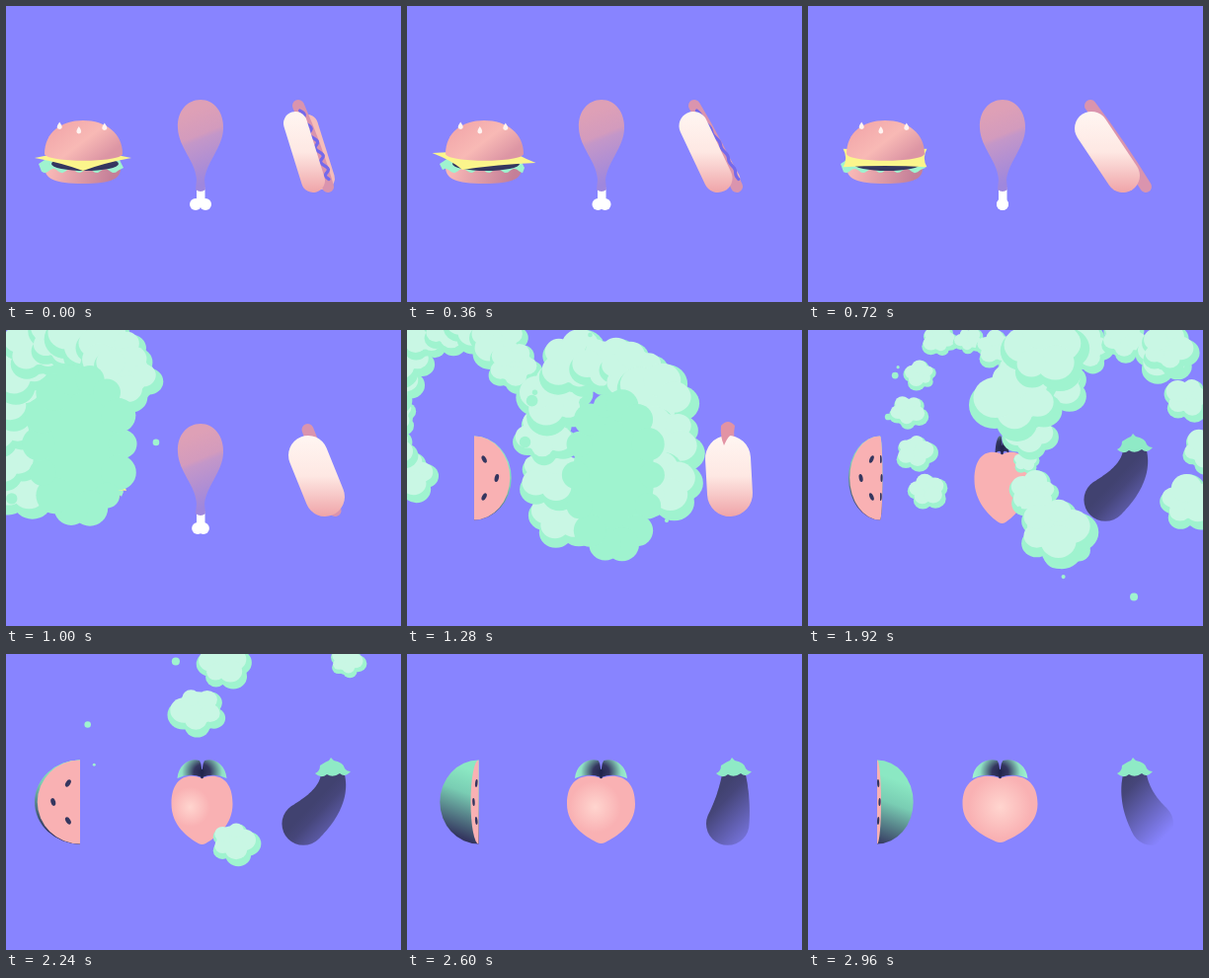
An HTML page with a canvas for the animation above (3000 ms loop, 400 by 300 pixels).

```html
<!DOCTYPE html>
<html lang="en">
<head>
<meta charset="utf-8">
<title>Food swap</title>
<style>
  html, body { margin: 0; width: 100%; height: 100%; overflow: hidden; background: #8884ff; }
  canvas { display: block; }
</style>
</head>
<body>
<canvas id="stage" width="400" height="300"></canvas>
<script>
const ctx = document.getElementById('stage').getContext('2d');
const LOOP = 3000, STEP = 40;
const BG = '#8884ff', MINT = '#9ff3cf', PALE = '#c9f7e4', NAVY = '#34365f', FLESH = '#f9b1b3';
const BURGER_END = 1040, CHICKEN_END = 1280, HOTDOG_END = 1600;
const rad = deg => deg * Math.PI / 180;
const clamp = v => Math.min(1, Math.max(0, v));
const mix = (a, b, k) => a + (b - a) * k;
const random = n => Math.abs(Math.sin(n * 127.1 + 3.7) * 43758.5453) % 1;

// Rows are [time, ...values]; returns the values at time t.
function track(t, rows) {
  let i = 0;
  while (i < rows.length - 2 && t > rows[i + 1][0]) i++;
  const a = rows[i], b = rows[i + 1];
  const k = clamp((t - a[0]) / (b[0] - a[0]));
  return a.slice(1).map((v, j) => mix(v, b[j + 1], k));
}

function stops(g, list) {
  list.forEach(([p, c]) => g.addColorStop(p, c));
  return g;
}
const linear = (x1, y1, x2, y2, ...list) => stops(ctx.createLinearGradient(x1, y1, x2, y2), list);
const radial = (x, y, r, ...list) => stops(ctx.createRadialGradient(x, y, 0, x, y, r), list);

function shape(d, fill) {
  ctx.fillStyle = fill;
  ctx.fill(new Path2D(d));
}

function oval(x, y, rx, ry, fill, tilt = 0) {
  ctx.fillStyle = fill;
  ctx.beginPath();
  ctx.ellipse(x, y, rx, ry, tilt, 0, 2 * Math.PI);
  ctx.fill();
}

function rod(x1, y1, x2, y2, w, color, bulge = 0) {
  ctx.strokeStyle = color;
  ctx.lineWidth = w;
  ctx.lineCap = 'round';
  ctx.beginPath();
  ctx.moveTo(x1, y1);
  ctx.quadraticCurveTo((x1 + x2) / 2 + bulge, (y1 + y2) / 2, x2, y2);
  ctx.stroke();
}

function burger(t) {
  shape('M39 163 L116 163 C117 175 107 180 78 180 C49 180 39 175 39 163Z',
    linear(45, 165, 105, 182, [0, '#f8b7b5'], [1, '#c47f98']));

  let leaf = 'M33 160 L42 154 L114 154 L119 164';
  for (let x = 117; x >= 34; x -= 3) leaf += ` L${x} ${167 + 2.2 * Math.sin(x * 0.36 + t / 110)}`;
  shape(leaf + 'Z', MINT);
  oval(80, 160, 34, 7, NAVY);

  // Square slice turning around the vertical axis
  const turn = rad(t * 0.3125);
  const reach = 49 + 11 * Math.abs(Math.sin(2 * turn));
  ctx.fillStyle = '#fbf58c';
  ctx.beginPath();
  for (let k = 0; k <= 4; k++) {
    const a = turn + k * Math.PI / 2, mid = a - Math.PI / 4;
    const x = 78 + reach * Math.cos(a), y = 154 + 13 * Math.sin(a);
    if (k) ctx.quadraticCurveTo(78 + reach * 0.62 * Math.cos(mid), 154 + 7 * Math.sin(mid), x, y);
    else ctx.moveTo(x, y);
  }
  ctx.fill();

  shape('M39 150 C39 128 56 116 78 116 C101 116 118 129 118 150 C116 159 41 159 39 150Z',
    linear(60, 118, 92, 160, [0, '#f3a9ab'], [0.5, '#f8b9b5'], [1, '#dc95a4']));
  for (let k = 0; k < 4; k++) {
    const a = rad(8 + k * 90 + t * 0.25), depth = Math.sin(a);
    if (depth < -0.3) continue;
    const x = 77 + 23 * Math.cos(a), y = 122 + 4 * depth;
    shape(`M${x} ${y - 4} Q${x + 5} ${y + 3} ${x} ${y + 3.5} Q${x - 5} ${y + 3} ${x} ${y - 4}Z`, '#fff3f1');
  }
}

function chicken(t) {
  const gap = 5 * Math.abs(Math.cos(rad(t * 0.125)));
  ctx.fillStyle = '#fff';
  ctx.fillRect(193, 184, 8.5, 16);
  for (const side of [-1, 1]) oval(197 + side * gap, 201, 6, 6, '#fff');
  shape('M197 95 C211 95 221 108 220 125 C219 144 203 158 201 176 L202 186 Q197 190 192 186 L193 176 C192 157 175 144 174 124 C173 107 183 95 197 95Z',
    linear(184, 108, 211, 175, [0, '#dea0b6'], [0.35, '#d39bbd'], [0.42, '#c497c8'], [1, '#9f87dd']));
}

function hotdog(t) {
  const [cx, lean, w, sx, tilt] = track(t, [
    [0, 302, 9, 24, 311, 15],
    [720, 303, 16, 34, 314, 28],
    [1280, 326, 1, 46, 325, 0]
  ]);
  const left = sx - tilt, right = sx + tilt;
  rod(left + 9, 121, right - 4, 175, Math.max(8, 22 - t / 50), '#f6bdb9');
  rod(left, 101, right, 183, 12, '#da94ae', 3);

  const amp = 2.6 * (1 - t / 560);
  if (amp > 0) {
    ctx.strokeStyle = '#7469ec';
    ctx.lineWidth = 3.2;
    ctx.beginPath();
    for (let k = 0; k <= 1; k += 0.02) {
      const side = (4 + t / 180) * (0.4 + 2 * k * (1 - k));
      ctx.lineTo(mix(left, right, k) + side + amp * Math.sin(k * 32), mix(106, 177, k));
    }
    ctx.stroke();
  }

  rod(cx - lean, 107 + w / 2, cx + lean, 189 - w / 2, w,
    linear(cx, 107, cx, 189, [0, '#fff6f2'], [0.5, '#fee8e3'], [1, '#efa4a8']));
  if (t > 1000) {
    shape(`M${sx - 7} 97 Q${sx} 89 ${sx + 7} 97 L${sx + 6} 104 Q${sx} 107 ${sx - 4} 117 Q${sx - 8} 108 ${sx - 7} 97Z`, '#e293a4');
  }
}

function halfOval(x, rx, fill) {
  ctx.fillStyle = fill;
  ctx.beginPath();
  ctx.ellipse(x, 150, Math.abs(rx), 42.5, 0, -Math.PI / 2, Math.PI / 2, rx < 0);
  ctx.fill();
}

// Wedge with two cut faces, 45 degrees apart, turning around the vertical axis
function melon(t) {
  const [axis, a] = track(t, [
    [1280, 68, 38], [1600, 70, 60], [1920, 73, 87], [2240, 75, 155], [2960, 70, 275]
  ]);
  const b = a + 45, R = 46;
  const xa = R * Math.cos(rad(a)), xb = R * Math.cos(rad(b));
  const rind = linear(axis + 12, 125, axis - 12, 188, [0, '#8be8c3'], [0.35, '#79cdb3'], [1, NAVY]);
  halfOval(axis, xa * 1.04, rind);
  halfOval(axis, xb * 1.04, rind);
  if (a < 180 && b > 180) halfOval(axis, -R, rind);
  for (const [x, shown] of [[xa, xa > 0], [xb, xb < 0]]) {
    if (!shown) continue;
    halfOval(axis, x, FLESH);
    for (let k = -1; k <= 1; k++) {
      const u = k ? 0.28 : 0.63;
      oval(axis + x * u, 150 + 19 * k, 1 + 1.4 * Math.abs(x) / R, 4, NAVY, x / R * (k || 0.5) * 0.6);
    }
  }
}

function peach(t) {
  const [cx, w, leaf, bottom, glow] = track(t, [
    [1600, 196, 33, 21, 197, 32],
    [1920, 196.5, 28, 7, 196, 1],
    [2240, 198.5, 31, 25, 193, 20],
    [2960, 194.5, 38, 28, 191, 32]
  ]);
  for (const size of [-leaf, leaf]) {
    const at = k => cx + size * k;
    shape(`M${cx} 125 Q${at(0.5)} 120 ${at(1)} 126 C${at(0.95)} 112 ${at(0.5)} 105 ${at(0.1)} 108 Q${cx} 112 ${cx} 125Z`,
      radial(cx, 120, 27, [0, '#22254d'], [0.3, NAVY], [0.75, '#8fe0c3'], [1, MINT]));
  }
  const at = k => cx + w * k;
  shape(`M${cx} 126 C${at(0.5)} 120 ${at(1)} 126 ${at(1)} 152 C${at(1)} 174 ${at(0.45)} ${bottom - 7} ${at(0.12)} ${bottom - 1} Q${cx} ${bottom + 1} ${at(-0.12)} ${bottom - 1} C${at(-0.45)} ${bottom - 7} ${at(-1)} 174 ${at(-1)} 152 C${at(-1)} 126 ${at(-0.5)} 120 ${cx} 126Z`,
    radial(cx - (32 - glow), 155, glow, [0, '#ffd5cf'], [1, FLESH]));
  rod(cx, 118, cx, 125, 2.5, '#22254d');
}

// Body is a row of growing discs along a bend that sways from left to right.
function eggplant(t) {
  const k = clamp((t - 2240) / 720), sway = mix(-31, 18, k), near = mix(332, 318, k);
  ctx.fillStyle = linear(near, 130, near + 50, 178, [0, '#414270'], [0.15, '#46467a'], [1, BG]);
  ctx.beginPath();
  for (let s = 0; s <= 1; s += 0.02) {
    const x = 331 + sway * s * s, y = 126 + 47 * s, r = 12.5 + 9.5 * s;
    ctx.moveTo(x + r, y);
    ctx.arc(x, y, r, 0, 2 * Math.PI);
  }
  ctx.fill();
  shape('M313 121 Q318 119 318 113 Q324 109 327 108 L329 105 L332 108 Q342 110 343 116 Q345 119 349 119 Q343 126 338 121 Q331 126 325 122 Q319 127 313 121Z', '#8feac6');
}

// A burst is an arc of puffs around a plain core; it is full size at time `at`.
function burst(at, x, y, rx, ry, endAngle, life) {
  const puffs = [];
  for (let i = 0; i < 10; i++) {
    const seed = at + i, a = rad(mix(130, endAngle, i / 9)), out = 0.92 + 0.16 * random(seed);
    puffs.push({
      x: x + rx * out * Math.cos(a), y: y + ry * out * Math.sin(a),
      r: 31 + 11 * random(seed + 0.3), life: life * (0.85 + 0.3 * random(seed + 0.6)), seed
    });
  }
  for (let i = 0; i < 5; i++) {
    const seed = at + 20 + i, a = 2 * Math.PI * random(seed);
    puffs.push({
      x: x + 1.3 * rx * Math.cos(a), y: y + 1.3 * ry * Math.sin(a),
      r: 2 + 4 * random(seed + 0.3), life: life * 1.1, seed
    });
  }
  return { at, x, y, puffs, core: { x: x + rx * 0.15, y: y + ry * 0.3, rx, ry } };
}

const stragglers = [[250, 205, 38], [215, 72, 44], [240, 26, 40], [365, 22, 28]];
const bursts = [
  burst(1040, 65, 90, 70, 85, 330, 500),
  burst(1280, 200, 120, 62, 90, 385, 900),
  burst(1600, 335, 135, 85, 115, 390, 600),
  { at: 1920, x: 290, y: 100, puffs: stragglers.map(([x, y, r], seed) => ({ x, y, r, life: 520, seed })) }
];

function puff(x, y, r, seed) {
  if (r < 0.5) return;
  if (r < 7) return oval(x, y, r, r, MINT);
  for (const [color, scale, lift] of [[MINT, 1, 0], [PALE, 0.86, 0.16]]) {
    const cx = x - r * lift * 0.4, cy = y - r * lift, s = r * scale;
    oval(cx, cy, s * 0.78, s * 0.7, color);
    for (let k = 0; k < 5; k++) {
      const a = k * 1.257 + seed * 1.7, lobe = s * (0.36 + 0.24 * random(seed + k * 0.17));
      oval(cx + s * 0.6 * Math.cos(a), cy + s * 0.5 * Math.sin(a), lobe, lobe * 0.92, color);
    }
  }
}

function smokeCore({ x, y, rx, ry }, size) {
  const bump = rx * 0.25 * size;
  oval(x, y, rx * 0.66 * size, ry * 0.84 * size, MINT);
  for (let k = 0; k < 14; k++) {
    const a = k * Math.PI / 7, r = bump * (0.75 + 0.4 * random(k + rx));
    oval(x + rx * 0.62 * size * Math.cos(a), y + ry * 0.8 * size * Math.sin(a), r, r, MINT);
  }
}

function smoke(t) {
  for (const { at, x, y, puffs, core } of bursts) {
    const age = t - at, grow = clamp(1 + age / 280), late = Math.max(0, age);
    if (!grow) continue;
    const ease = 1 - (1 - grow) ** 2;
    for (const p of puffs) {
      const size = ease * (1 - (late / p.life) ** 2);
      puff(mix(x, p.x, ease) - 0.06 * late, mix(y, p.y, ease) - 0.04 * late, p.r * size, p.seed);
    }
    const coreSize = ease * (1 - late / 230);
    if (core && coreSize > 0) smokeCore(core, coreSize);
  }
}

function draw() {
  const t = Math.floor(performance.now() % LOOP / STEP) * STEP;
  ctx.fillStyle = BG;
  ctx.fillRect(0, 0, 400, 300);
  (t < BURGER_END ? burger : melon)(t);
  (t < CHICKEN_END ? chicken : peach)(t);
  (t < HOTDOG_END ? hotdog : eggplant)(t);
  smoke(t);
  requestAnimationFrame(draw);
}
draw();
</script>
</body>
</html>
```
